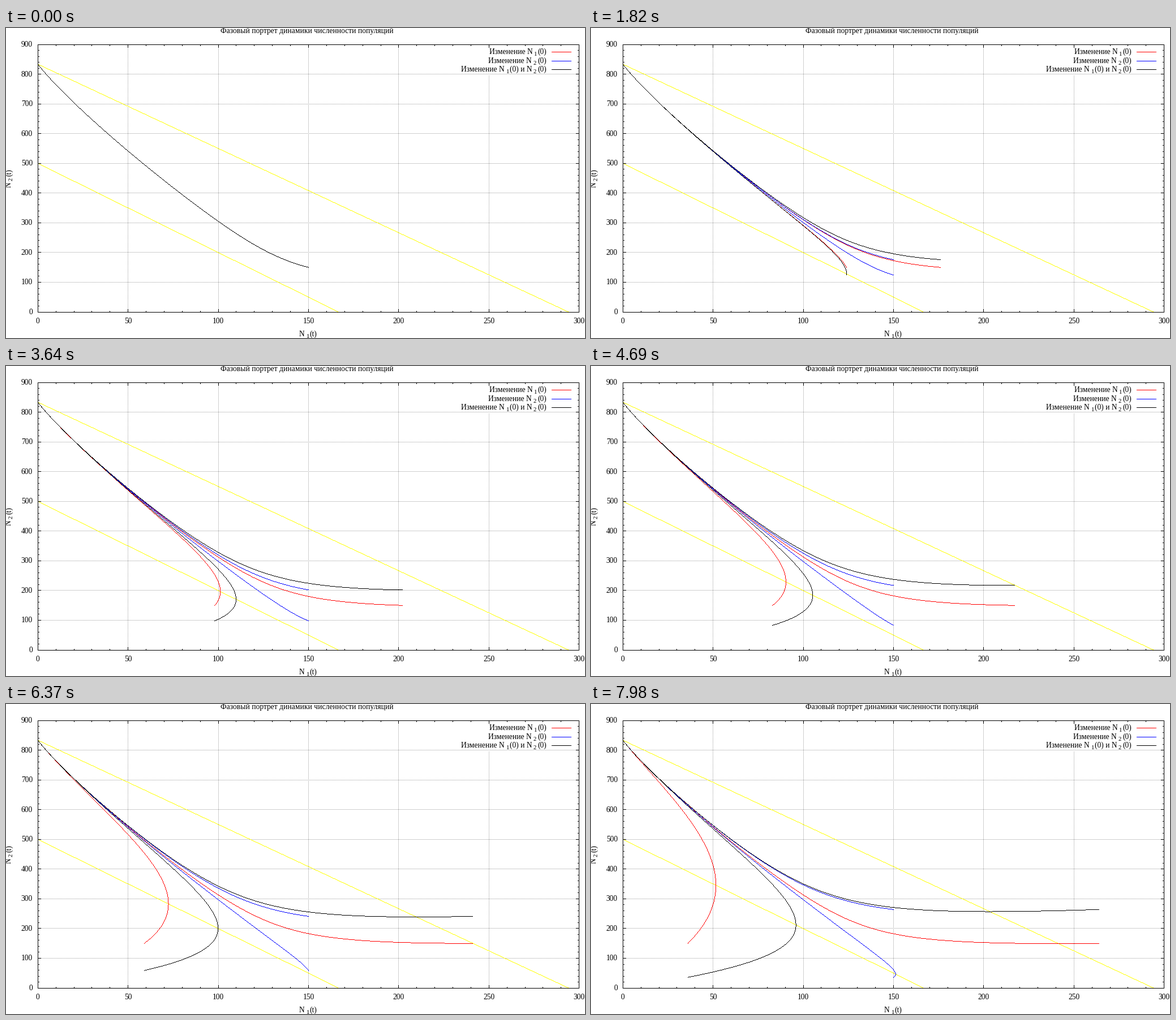
A matplotlib script that plays this animation: 1023x548 px, repeating every 8 s.

```python
import numpy as np
import matplotlib.pyplot as plt
from matplotlib.animation import FuncAnimation
from matplotlib.patches import PathPatch
from matplotlib.path import Path

W, H, DPI = 1023, 548, 64
PX = 72 / DPI                      # one pixel in points
LEFT, RIGHT, TOP, BOTTOM = 56.33, 1012.67, 29.03, 502.05
X_MAX, Y_MAX = 300, 900
LOOP, TICK, HOLD = 8000, 20, 70    # ms
FONT, SMALL = 13.5, 10.8

plt.rcParams["font.family"] = "Liberation Serif"

fig = plt.figure(figsize=(W / DPI, H / DPI), dpi=DPI, facecolor="white")
ax = fig.add_axes([0, 0, 1, 1])
ax.set_xlim(0, W)
ax.set_ylim(H, 0)
ax.set_axis_off()


def sx(n1):
    return LEFT + n1 * (RIGHT - LEFT) / X_MAX


def sy(n2):
    return BOTTOM - n2 * (BOTTOM - TOP) / Y_MAX


def boxes(x, y, w=1, h=1):
    """One path of whole-pixel rectangles."""
    x, y, w, h = np.broadcast_arrays(x, y, w, h)
    xs = np.stack([x, x + w, x + w, x, x], axis=-1)
    ys = np.stack([y, y, y + h, y + h, y], axis=-1)
    verts = np.stack([xs, ys], axis=-1).reshape(-1, 2).astype(float)
    codes = [Path.MOVETO] + [Path.LINETO] * 3 + [Path.CLOSEPOLY]
    return Path(verts, np.tile(codes, len(verts) // 5))


def ink(path, color, z):
    patch = PathPatch(path, facecolor=color, edgecolor="none", lw=0,
                      snap=False, zorder=z)
    ax.add_artist(patch)
    return patch


def trace(x, y):
    """Pixels of a hard one-pixel line through the given points."""
    length = np.r_[0, np.cumsum(np.hypot(np.diff(x), np.diff(y)))]
    s = np.linspace(0, length[-1], int(length[-1] * 12) + 2)
    x, y = np.interp(s, length, x), np.interp(s, length, y)
    steep = np.abs(np.gradient(y)) > np.abs(np.gradient(x))
    # one pixel per column where flat, one per row where steep
    cross_x = np.diff(np.floor(x + 0.5)) != 0
    cross_y = np.diff(np.floor(y + 0.5)) != 0
    keep = np.r_[True, np.where(steep[1:], cross_y, cross_x)]
    keep[-1] = True
    return boxes(np.floor(x[keep]), np.floor(y[keep]))


def text(x, y, s, size=FONT, ha="left", turn=0):
    ax.text(x, y, s, fontsize=size * PX, ha=ha, va="baseline",
            rotation=turn, rotation_mode="anchor", zorder=6)


l, r, t, b = (int(v) for v in (LEFT, RIGHT, TOP, BOTTOM))


def draw_grid():
    dots = []
    for v in range(50, X_MAX, 50):
        rows = np.arange(b, t, -2)
        if v == 250:               # leaves room for the legend
            rows = rows[(rows > 82) | (rows < 34)]
        dots.append(np.stack([np.full(len(rows), int(sx(v))), rows]))
    for v in range(100, Y_MAX, 100):
        cols = np.arange(l, r, 2)
        dots.append(np.stack([cols, np.full(len(cols), int(sy(v)))]))
    ink(boxes(*np.hstack(dots)), "#a0a0a0", 1)


def draw_frame():
    w, h = r - l + 1, b - t + 1
    bars = [(l, t, w, 1), (l, b, w, 1), (l, t, 1, h), (r, t, 1, h)]
    for v in range(0, X_MAX + 1, 10):
        x, size = int(sx(v)), 6 if v % 50 == 0 else 3
        bars += [(x, t, 1, size), (x, b - size + 1, 1, size)]
    for v in range(0, Y_MAX + 1, 20):
        y, size = int(sy(v)), 6 if v % 100 == 0 else 3
        bars += [(l, y, size, 1), (r - size + 1, y, size, 1)]
    ink(boxes(*np.transpose(bars)), "black", 5)


def draw_labels():
    for v in range(0, X_MAX + 1, 50):
        text(sx(v), 522, str(v), ha="center")
    for v in range(0, Y_MAX + 1, 100):
        text(47, sy(v) + 4, str(v), ha="right")
    text(532, 9, "Фазовый портрет динамики численности популяций", ha="center")

    text(517.5, 545, "N")
    text(532.5, 548, "1", SMALL, "center")
    text(536.5, 545, "(t)")

    text(9, 282, "N", turn=90)
    text(12, 267.5, "2", SMALL, "center", 90)
    text(9, 262, "(t)", turn=90)


def draw_legend():
    rows = [(46, 853.5, "1", "red"), (62, 852.5, "2", "blue"), (77, 804.5, "2", "black")]
    for base, x, sub, color in rows:
        text(x, base, "Изменение N")
        text(934.5, base + 3, sub, SMALL, "center")
        text(939, base, "(0)")
        ink(boxes(964, base - 4, 35, 1), color, 4)
    text(886, 80, "1", SMALL, "center")
    text(890, 77, "(0) и N")


def rate(n):
    """Two competing species."""
    n1, n2 = n
    return np.array([n1 * (1 - (3 * n1 + n2) / 500),
                     n2 * (1 - (17 * n1 / 6 + n2) / (2500 / 3))])


def trajectories(start, dt=0.05, steps=400):
    path = [start]
    for _ in range(steps):
        n = path[-1]
        k1 = rate(n)
        k2 = rate(n + dt / 2 * k1)
        k3 = rate(n + dt / 2 * k2)
        k4 = rate(n + dt * k3)
        path.append(n + dt / 6 * (k1 + 2 * k2 + 2 * k3 + k4))
    return np.array(path)


draw_grid()
draw_frame()
draw_labels()
draw_legend()
for x_end, y_start in ((500 / 3, 500), (5000 / 17, 2500 / 3)):
    ink(trace(sx(np.array([0, x_end])), sy(np.array([y_start, 0]))), "yellow", 2)

# Each curve shifts its starting point away from (150, 150).
CURVES = [(1, 0, "red"), (-1, 0, "red"), (0, 1, "blue"),
          (0, -1, "blue"), (1, 1, "black"), (-1, -1, "black")]
shift = np.arange(LOOP // HOLD + 1)
dirs = np.array([c[:2] for c in CURVES], float)
# axes: time, species, curve, shift
paths = trajectories(150 + dirs.T[:, :, None] * shift)
px, py = sx(paths[:, 0]), sy(paths[:, 1])
curves = [ink(boxes([0], [0]), c[2], 3) for c in CURVES]


def update(i):
    step = (i * TICK + TICK // 2) // HOLD
    for k, curve in enumerate(curves):
        curve.set_path(trace(px[:, k, step], py[:, k, step]))
    return curves


anim = FuncAnimation(fig, update, frames=LOOP // TICK, interval=TICK,
                     repeat=True, repeat_delay=0, blit=False)
plt.show()
```
